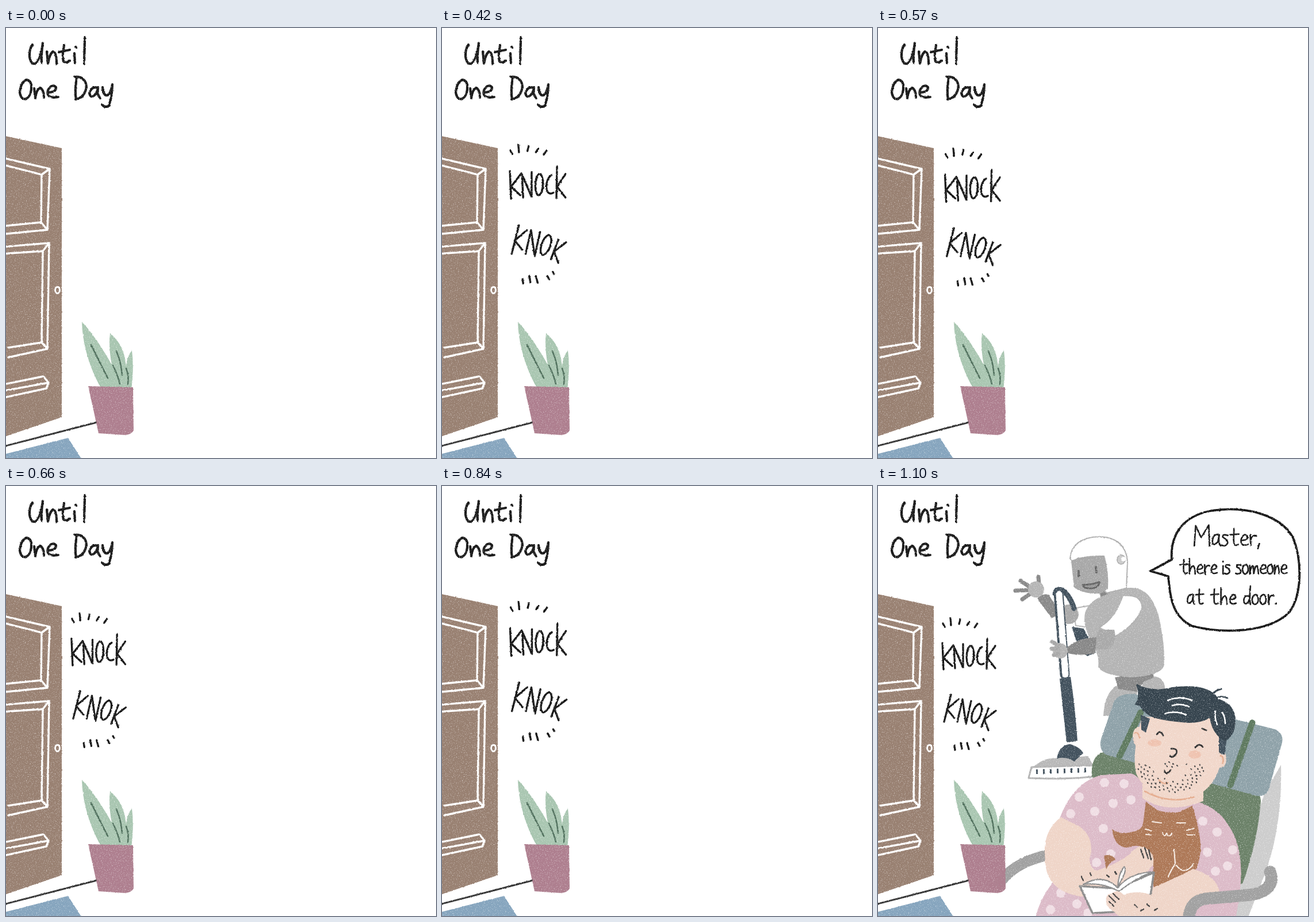
Write an HTML page that moves like this. It is 748 by 748 pixels and loops after 1230 ms.

```html
<!DOCTYPE html>
<html lang="en">
<head>
<meta charset="utf-8">
<title>Until One Day</title>
<style>
html, body { margin: 0; height: 100%; overflow: hidden; background: #fff; }
svg { position: absolute; left: 0; top: 0; width: 748px; height: 748px; will-change: transform; }
path, ellipse, circle { stroke-linecap: round; stroke-linejoin: round; }
.line { fill: none; }
.chalk { filter: url(#chalk); }
</style>
</head>
<body>
<svg viewBox="0 0 748 748">
  <defs>
    <!-- wobbly edges and paper grain -->
    <filter id="chalk" color-interpolation-filters="sRGB">
      <feTurbulence type="fractalNoise" baseFrequency=".3" numOctaves="2" seed="4" result="wobble"/>
      <feDisplacementMap in="SourceGraphic" in2="wobble" scale="2.5" xChannelSelector="R" yChannelSelector="G" result="rough"/>
      <feTurbulence type="fractalNoise" baseFrequency=".6" numOctaves="2" seed="9"/>
      <feColorMatrix values="0 0 0 0 0  0 0 0 0 0  0 0 0 0 0  0 0 0 2 .15" result="grain"/>
      <feComposite in="rough" in2="grain" operator="in"/>
    </filter>
  </defs>

  <g id="scene" class="chalk">
    <g id="robot">
      <path fill="#b5b5b5" d="M418 345Q394 358 392 400L450 400L450 350Z"/>
      <circle fill="#b5b5b5" cx="479" cy="351" r="20"/>
      <path fill="#8a8a8a" d="M412 333L480 320L479 333L462 341L450 358L418 353Z"/>
      <path fill="#43525e" d="M338 245L358 248L379 290L364 296Q344 278 338 245Z"/>
      <path fill="#fff" stroke="#b5b5b5" stroke-width="2" d="M340 213L374 207L361 230L369 246L344 243Z"/>
      <circle fill="#a9a9a9" cx="332" cy="223" r="17"/>
      <path fill="#8a8a8a" d="M277 196Q285 186 297 189L317 222L302 230Z"/>
      <path class="line" stroke="#8a8a8a" stroke-width="7" d="M280 170L279 158M263 175L248 165M262 181L239 182M264 188L251 197"/>
      <circle fill="#b5b5b5" cx="275" cy="180" r="14"/>
      <path fill="#888" d="M385 180L419 178L418 191Q401 196 387 193Z"/>
      <path fill="#b4b4b4" d="M395 190Q440 167 465 185Q486 202 493 250Q500 290 497 314Q490 330 440 333Q393 330 383 315Q386 295 372 272Q354 240 361 218Q369 198 395 190Z"/>
      <path fill="#fff" stroke="#b0b0b0" stroke-width="1.5" d="M426 191Q459 188 459 212Q450 240 413 261L385 246Q412 232 426 191Z"/>
      <path fill="#fff" stroke="#b0b0b0" stroke-width="2" d="M334 126Q337 90 385 88Q431 90 434 132L432 178L398 186Z"/>
      <path fill="#a8a8a8" d="M336 130Q356 120 394 121Q402 150 400 179L387 187Q354 188 341 176Z"/>
      <ellipse fill="#ccc" stroke="#b0b0b0" stroke-width="2" cx="423" cy="128" rx="7" ry="8"/>
      <circle fill="#fff" cx="427" cy="127" r="4"/>
      <path class="line" stroke="#666" stroke-width="4" d="M349 148L349 157M379 141L380 150"/>
      <path fill="#999" stroke="#666" stroke-width="3" d="M356 172Q371 172 385 167Q384 177 372 178Q358 179 356 172Z"/>
    </g>
    <g id="vacuum">
      <path class="line" stroke="#43525e" stroke-width="9" d="M308 188Q309 178 320 181Q334 190 341 213"/>
      <path class="line" stroke="#43525e" stroke-width="17" d="M314 186L325 328"/>
      <path class="line" stroke="#fff" stroke-width="11" d="M315 188L326 328"/>
      <path fill="#43525e" d="M316 335L335 332Q343 385 347 443L328 446Q323 400 316 335Z"/>
      <path fill="#b8b8b8" d="M266 492Q285 475 300 474L365 470L377 490Z"/>
      <path fill="#fff" stroke="#b4b4b4" stroke-width="3" d="M262 508L267 489L374 486L379 505Q330 511 262 508Z"/>
      <path class="line" stroke="#43525e" stroke-width="8" stroke-dasharray="3 9" style="stroke-linecap: butt" d="M275 497L370 494"/>
      <path fill="#43525e" d="M311 474Q315 451 334 449Q353 455 357 465L341 479Q328 470 311 474Z"/>
      <path fill="#a9a9a9" d="M384 250L411 250Q417 273 401 283Q383 287 374 278Z"/>
      <path fill="#888" d="M329 280Q350 264 380 263L378 291Q350 296 330 291Z"/>
      <circle fill="#b4b4b4" cx="317" cy="287" r="13"/>
      <path class="line" stroke="#a9a9a9" stroke-width="7" d="M315 278L303 271M313 283L302 283M314 291L306 294"/>
    </g>
    <g id="chair">
      <path fill="#cdcdcd" d="M672 535L701 485Q704 600 668 688L640 760H600Z"/>
      <path fill="#6c8269" d="M372 505Q369 463 400 462L470 465L600 500Q665 518 666 548Q660 620 634 692L560 700Z"/>
      <path fill="#8fa2a9" d="M411 374Q420 360 446 362L690 423Q708 431 702 450L679 530Q671 543 655 538L398 468Q383 460 388 440Z"/>
      <path class="line" stroke="#5f7a60" stroke-width="11" d="M457 394L420 470M651 412L613 520"/>
      <path class="line" stroke="#a1a1a1" stroke-width="19" d="M212 690Q238 653 300 641"/>
    </g>
    <g id="man">
      <path fill="#dcbbc8" d="M388 503Q340 515 316 578Q335 640 300 695Q278 725 272 760H620Q648 640 608 588Q590 556 540 545L470 545Q460 505 440 500Z"/>
      <g id="dots" fill="#f0dee4"></g>
      <path fill="#efd5c8" d="M318 576Q284 602 291 652Q292 704 352 714Q405 715 440 692Q475 675 480 648Q470 618 452 628Q425 655 380 669Q363 662 371 636Q372 606 350 592Z"/>
      <path fill="#efd5c8" d="M460 515L460 543Q505 573 566 548L566 510Z"/>
      <ellipse fill="#efd5c8" cx="453" cy="436" rx="10" ry="17"/>
      <ellipse fill="#efd5c8" cx="597" cy="475" rx="9" ry="15"/>
      <path fill="#f1d7ca" d="M459 402Q441 465 449 500Q465 538 518 545Q568 545 588 505Q604 470 606 438L580 398Z"/>
      <path class="line" stroke="#e5ad90" stroke-width="2.6" d="M447 430Q452 426 455 438M596 469Q602 470 600 482M464 531Q505 554 550 541M489 512Q497 520 504 516"/>
      <path fill="#43525e" d="M457 398L473 405L466 429L458 424ZM593 436L607 438L603 468L593 464Z"/>
      <path fill="#37454f" d="M449 344Q475 359 512 350Q575 342 592 370Q622 380 622 408Q621 436 603 444Q582 432 577 404Q555 415 528 411Q482 407 470 398Q460 392 456 383L446 380Q457 370 449 344Z"/>
      <path class="line" stroke="#37454f" stroke-width="3" d="M576 372Q581 357 597 353M582 375Q592 362 608 369"/>
      <path class="line" stroke="#fff" stroke-width="2.5" d="M504 373Q525 364 546 373M512 382Q526 377 541 384M499 396Q518 390 536 398M587 392Q585 404 590 415M599 394Q604 402 604 413"/>
      <g fill="#efc3b0"><ellipse cx="481" cy="447" rx="12" ry="6"/><ellipse cx="551" cy="467" rx="11" ry="7"/></g>
      <path class="line" stroke="#333" stroke-width="2.8" d="M485 432Q491 423 496 434M552 455Q559 446 565 454M564 422L571 425M510 457Q522 456 519 465Q514 474 508 470M498 495Q502 505 509 494"/>
      <path id="stubble" class="line" stroke="#444" stroke-width="2.2"/>
    </g>
    <g id="cat">
      <path fill="#ae7958" d="M466 549L486 564Q508 570 525 567L547 556Q558 590 561 622Q563 665 535 692Q508 714 480 711L478 674Q482 648 466 632Q452 621 435 629Q412 630 407 597Q424 608 440 602Q458 600 461 588ZM393 643Q407 639 413 650Q402 654 397 667Z"/>
      <path class="line" stroke="#f6ebe3" stroke-width="2.2" d="M477 584L493 586M520 586L535 586M495 603Q498 613 502 604Q507 613 511 604M466 597L476 600M466 606L475 607M537 599L549 596M537 607L551 607M515 632L517 657Q510 668 505 679M519 660Q534 679 549 657"/>
      <path fill="#efd5c8" d="M441 636Q458 621 470 633Q484 645 477 661L450 675L430 660Z"/>
      <path class="line" stroke="#444" stroke-width="2.3" d="M457 632L462 646M464 629L470 648M471 633L475 650M354 680L357 686M369 673L371 678M370 688L375 691M386 684L390 686M398 677L402 680M412 671L415 675"/>
    </g>
    <g id="book">
      <path fill="#efd5c8" d="M398 722Q410 705 440 712Q500 692 548 666Q592 680 594 708L545 722L530 760H450Q405 748 398 722Z"/>
      <path fill="#fff" stroke="#8c8c8c" stroke-width="3.6" d="M351 696L416 700L480 672L474 712Q440 713 411 741L373 743Z"/>
      <path fill="#fff" stroke="#8c8c8c" stroke-width="2.2" d="M357 693Q392 673 417 699Q436 674 477 671Q449 682 419 705Q390 689 357 693ZM417 698Q418 675 428 662Q434 667 423 686Z"/>
      <path fill="#efd5c8" d="M397 724Q395 710 406 709Q418 700 427 711Q460 700 487 718L490 744L430 748Q400 740 397 724Z"/>
      <path class="line" stroke="#444" stroke-width="2.3" d="M402 713L413 724M409 709L419 719M402 723L410 731M446 728L451 733M457 739L462 736M468 728L472 731M481 738L486 735"/>
      <path class="line" stroke="#a1a1a1" stroke-width="21" d="M540 765Q538 722 570 718L650 711Q693 703 682 671"/>
    </g>
    <path fill="#fff" stroke="#161616" stroke-width="3.8" d="M511 128C508 85 530 52 580 43C640 34 700 50 722 90C738 130 738 190 715 220C680 255 600 258 545 243C510 225 508 190 505 157L474 148Z"/>
    <g id="speech" class="line" stroke="#1a1a1a"></g>
  </g>

  <g id="room" class="chalk">
    <g class="line" stroke="#1a1a1a" stroke-width="4.2">
      <path d="M46 29Q40 38 41 50Q43 63 50 62Q60 58 64 26Q61 45 62 61M71 41L73 62Q76 44 82 41Q88 42 88 62M92 42L111 38M101 30Q97 50 100 58Q104 62 111 57M119 44L120 61M121 33L122 34M137 16L136 62"/>
      <path d="M36 90Q26 93 24 112Q26 126 36 123Q45 116 44 100Q42 88 33 91M49 105L51 122Q53 106 60 104Q66 108 66 121M72 112Q88 112 87 103Q80 96 73 108Q69 124 91 120M123 86Q119 110 122 124M120 85Q139 84 140 103Q136 122 121 124M159 104Q149 101 145 113Q147 123 154 117Q160 110 160 103Q158 117 164 122M168 103Q169 119 177 117Q183 112 185 98Q184 125 178 136Q171 139 167 133"/>
    </g>
    <path fill="#998172" d="M-20 184L97 209L97 677L-20 717Z"/>
    <path class="line" stroke="#fff" stroke-width="3.4" d="M-9 225L76 245L72 351L-9 359M-9 237L62 255L61 338L-9 345M76 245L62 255M72 351L61 338M-9 381L75 374L72 558L4 573M-9 393L64 388L62 547L4 556M75 374L64 388M72 558L62 547M-9 621L65 606L74 617L70 627L-9 644M-9 632L74 617"/>
    <ellipse class="line" stroke="#fff" stroke-width="3" cx="89.5" cy="456" rx="4" ry="5.5"/>
    <path class="line" stroke="#333" stroke-width="3" d="M-9 729L158 686"/>
    <path fill="#86a5be" d="M-9 743L108 713L136 757H-9Z"/>
    <path fill="#a9c6b1" d="M132 511C150 530 170 560 184 586Q178 555 181 531Q205 550 209 587Q211 570 219 561Q223 590 218 629L165 626C145 590 133 550 132 511Z"/>
    <path class="line" stroke="#50705d" stroke-width="2.6" d="M148 551Q162 580 177 609M186 587Q194 603 198 619M192 562Q200 580 202 604M209 592Q214 605 212 619"/>
    <path fill="#ae7f8f" d="M143 623L221 625L222 700Q219 707 206 708L161 705Z"/>
  </g>
</svg>

<svg viewBox="0 0 748 748">
  <g id="knock" class="chalk">
    <g class="line" stroke="#161616" stroke-width="3.3">
      <path d="M112 273L114 319M131 277L114 299L129 313M134 317L132 279L148 316L148 275M161 278C151 282 153 315 160 313C169 310 169 276 160 278M181 280C169 286 169 317 184 309M190 266L189 318M204 278L190 299L204 317"/>
      <path d="M127 363L115 410M140 371L120 388L133 404M138 410L147 371L153 414L162 374M177 379C166 380 158 409 166 412C176 412 187 383 176 379M192 387L180 419M205 391L185 406L192 425"/>
      <path d="M113 239L116 245M126 230L127 242M143 232L141 240M159 236L155 242M173 239L168 246M133 452L134 459M144 447L146 457M155 447L158 458M174 447L177 452M183 440L185 443"/>
    </g>
  </g>
</svg>

<script>
const $ = id => document.getElementById(id);

// Handwritten letters: [width, strokes], baseline at y = 0
const glyphs = {
  M: [24, 'M3-29L1 0M3-29L11-12L22-30L23 0'],
  a: [12, 'M10-16Q2-18 1-6Q2 2 9-6L11-16Q9-4 13 0'],
  d: [12, 'M10-13Q2-17 1-6Q2 2 8-3L11-10M12-30Q10-8 12 0'],
  e: [11, 'M1-8Q12-8 10-14Q5-20 1-9Q0 2 11-2'],
  h: [12, 'M1-27L1 0Q3-14 8-14Q11-11 11 0'],
  i: [2, 'M1-14L1 0M1-22L1-21'],
  m: [17, 'M1-15L1 0Q3-15 7-14L8 0Q10-15 14-14Q16-8 16 0'],
  n: [10, 'M1-15L1 0Q3-15 7-14Q9-9 9 0'],
  o: [10, 'M5-16Q0-14 0-7Q1 0 5 0Q10-1 10-9Q9-17 5-16'],
  r: [10, 'M1-16L2 0M2-9Q5-17 10-14'],
  s: [10, 'M9-15Q1-18 2-12Q9-9 9-4Q6 2 0-1'],
  t: [13, 'M0-16L13-17M6-25Q5-8 6-3Q8 1 12-2'],
  ',': [3, 'M2-3L0 4'],
  '.': [2, 'M1-2L1-1'],
  ' ': [6, '']
};

function write(text, x, y, size, gap) {
  let out = '';
  for (const char of text) {
    const [width, d] = glyphs[char];
    out += `<path d="${d}" transform="translate(${x} ${y}) scale(${size})" stroke-width="${2.7 / size}"/>`;
    x += (width + gap) * size;
  }
  return out;
}

$('speech').innerHTML =
  write('Master,', 549, 104, 1.2, 2.2) +
  write('there is someone', 526, 153, 1, 1.7) +
  write('at the door.', 537, 206, 1.06, 2.8);

const dots = [[394, 516], [350, 541], [377, 566], [409, 552], [335, 570], [440, 546], [428, 518], [392, 596],
  [405, 640], [380, 655], [565, 583], [590, 602], [617, 633], [573, 637], [608, 661], [587, 670], [300, 737],
  [318, 708], [346, 727], [365, 743]];
$('dots').innerHTML = dots.map(([x, y]) => `<circle cx="${x}" cy="${y}" r="8"/>`).join('');

// Beard stubble spread evenly over the lower half of an ellipse
let stubble = 'M499 483l1 1M506 480l1 1M513 483l1 1M520 486l1 1M502 487l1 1M511 488l1 1';
for (let i = 0; i < 64; i++) {
  const angle = -.05 + i * .618034 % 1 * 3.25, r = .45 + .52 * Math.sqrt(i / 64);
  stubble += `M${510 + 60 * r * Math.cos(angle)} ${485 + 50 * r * Math.sin(angle)}l.5 1`;
}
$('stubble').setAttribute('d', stubble);

// Lift of the knocking words: two linear bounces
const keys = [[330, 0], [487, 1], [633, 0], [783, 1], [930, 0]];
function lift(t) {
  for (let i = 1; i < keys.length; i++) {
    const [t0, a] = keys[i - 1], [t1, b] = keys[i];
    if (t >= t0 && t < t1) return a + (b - a) * (t - t0) / (t1 - t0);
  }
  return 0;
}

function draw() {
  const t = performance.now() % 1230;
  const k = lift(Math.floor(t / 30) * 30);
  $('scene').style.display = t >= 1100 ? '' : 'none';
  $('knock').style.display = t >= 330 ? '' : 'none';
  $('knock').setAttribute('transform', `translate(${.5 * k} ${-67 * k}) scale(${1 + .09 * k})`);
  requestAnimationFrame(draw);
}
draw();
</script>
</body>
</html>
```
